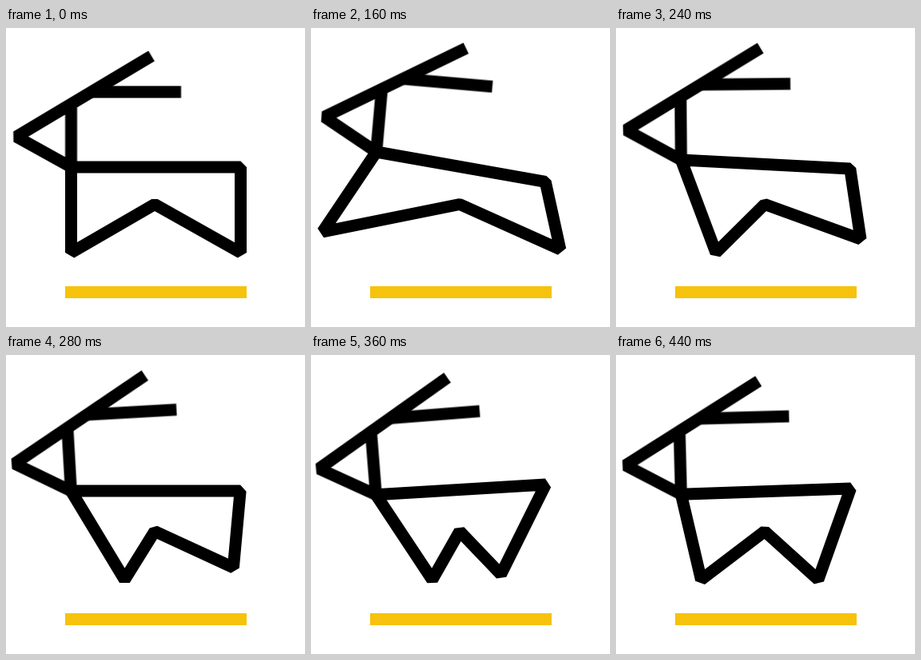
An HTML page for the animation above (0.48 s loop, 374 px wide and 374 px high).

```html
<!DOCTYPE html>
<html lang="en">
<head>
<meta charset="utf-8">
<title>Running goat</title>
<style>
  html, body { margin: 0; width: 100%; height: 100%; overflow: hidden; background: #fff; }
  svg { display: block; width: 100vw; height: 100vh; }

  .goat { fill: none; stroke: #000; stroke-width: 15; stroke-linejoin: bevel; }
  .ground { fill: #f6c20c; }

  .head { animation: nod 480ms steps(4, end) infinite; }
  .body { animation: gallop 480ms steps(2, end) infinite; }

  /* The head is rigid and turns around the chest. */
  @keyframes nod {
    0%, 100% { transform: translate(81.5px, 174px) rotate(0deg); }
    33.333%  { transform: translate(81.7px, 155px) rotate(5deg); }
    66.666%  { transform: translate(81.2px, 175px) rotate(-6deg); }
  }

  /* Chest, hip, hind foot, belly, front foot. */
  @keyframes gallop {
    0% {
      d: path("M81.5 174 L293.5 174 L293.5 281 L186 220.5 L81.5 281 Z");
      animation-timing-function: steps(4, end);
    }
    33.333% { d: path("M81.7 155 L293.2 192.3 L311.8 277 L186 220.5 L14.5 255 Z"); }
    50%     { d: path("M81.5 165 L292.8 176 L306 264 L186 220.5 L125 281 Z"); }
    66.666% { d: path("M81.2 175 L293.4 164 L262.8 267.8 L186 220.5 L171.8 281 Z"); }
    83.333% { d: path("M81.4 174.6 L293.4 160.2 L212.3 281 L186 220.5 L131.5 281 Z"); }
    100%    { d: path("M81.5 174 L293.5 174 L293.5 281 L186 220.5 L81.5 281 Z"); }
  }
</style>
</head>
<body>
<svg viewBox="0 0 374 374">
  <rect class="ground" x="74" y="323" width="227" height="15"/>
  <g class="goat">
    <path class="body" d="M81.5 174 L293.5 174 L293.5 281 L186 220.5 L81.5 281 Z"/>
    <g class="head">
      <path d="M100.5 -139 L-68.5 -38 L0 0 V-79"/>
      <path d="M25.2 -94 H137.5"/>
    </g>
  </g>
</svg>
</body>
</html>
```
